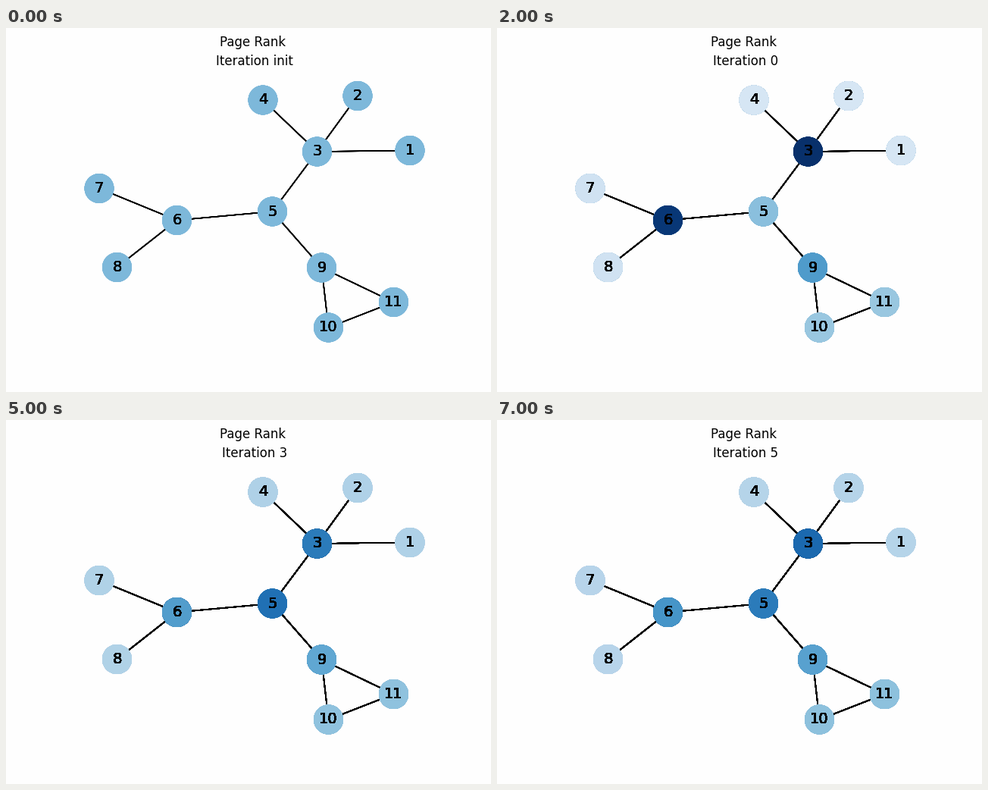
A matplotlib script for the animation above (8000 ms loop, 640x480 px).

```python
import numpy as np
import matplotlib.pyplot as plt
from matplotlib.animation import FuncAnimation
from matplotlib.collections import LineCollection

W, H, DPI = 640, 480, 100
FRAMES, INTERVAL = 8, 1000
DAMPING, VMAX = 0.85, 0.2
COPIES = 6  # each step draws the graph again on top, hardening its edges

# Node centres in stage pixels, nodes 1 to 11
pos = np.array([
    (533, 161.5), (464, 89.5), (410.5, 163), (339, 95), (351.5, 242),
    (225.5, 253.5), (123, 211.5), (146.5, 315.5),
    (416.5, 316), (425.5, 395), (511.5, 361.5),
])
N = len(pos)

# Each hub with the nodes it links to
hubs = {3: (1, 2, 4, 5), 6: (5, 7, 8), 9: (5, 10, 11), 10: (11,)}
edges = [(hub - 1, node - 1) for hub, nodes in hubs.items() for node in nodes]

adj = np.zeros((N, N))
for a, b in edges:
    adj[a, b] = adj[b, a] = 1
walk = adj / adj.sum(axis=0)


def rank(steps):
    """Page rank values after a number of power iterations."""
    x = np.full(N, 1 / N)
    for _ in range(steps):
        x = (1 - DAMPING) / N + DAMPING * walk @ x
    return x


plt.rcParams["font.family"] = "DejaVu Sans"
fig = plt.figure(figsize=(W / DPI, H / DPI), dpi=DPI, facecolor="#fefefe")
ax = fig.add_axes([0, 0, 1, 1])
ax.set_xlim(0, W)
ax.set_ylim(H, 0)
ax.axis("off")

ax.text(282, 24.2, "Page Rank", size=12)
title = ax.text(328, 49.2, "", size=12, ha="center")


def draw_graph(values):
    lines = LineCollection([pos[list(e)] for e in edges],
                           colors="black", linewidths=1, zorder=1)
    ax.add_collection(lines, autolim=False)
    nodes = ax.scatter(*pos.T, s=700, c=values, cmap="Blues",
                       vmin=0, vmax=VMAX, linewidths=1.5, zorder=2)
    labels = [ax.text(x, y, str(i), size=14, ha="center", va="center",
                      zorder=3) for i, (x, y) in enumerate(pos, 1)]
    return [lines, nodes, *labels]


def iteration(n):
    """Iteration shown at step n; negative while still at the start."""
    return n - 2


layers = [[artist for _ in range(COPIES)
           for artist in draw_graph(rank(max(0, iteration(n) + 1)))]
          for n in range(FRAMES)]


def update(n):
    i = iteration(n)
    title.set_text(f"Iteration {i if i >= 0 else 'init'}")
    for k, layer in enumerate(layers):
        for artist in layer:
            artist.set_visible(k <= n)
    return [title]


anim = FuncAnimation(fig, update, frames=FRAMES, interval=INTERVAL,
                     repeat=True, repeat_delay=0, blit=False)
plt.show()
```
